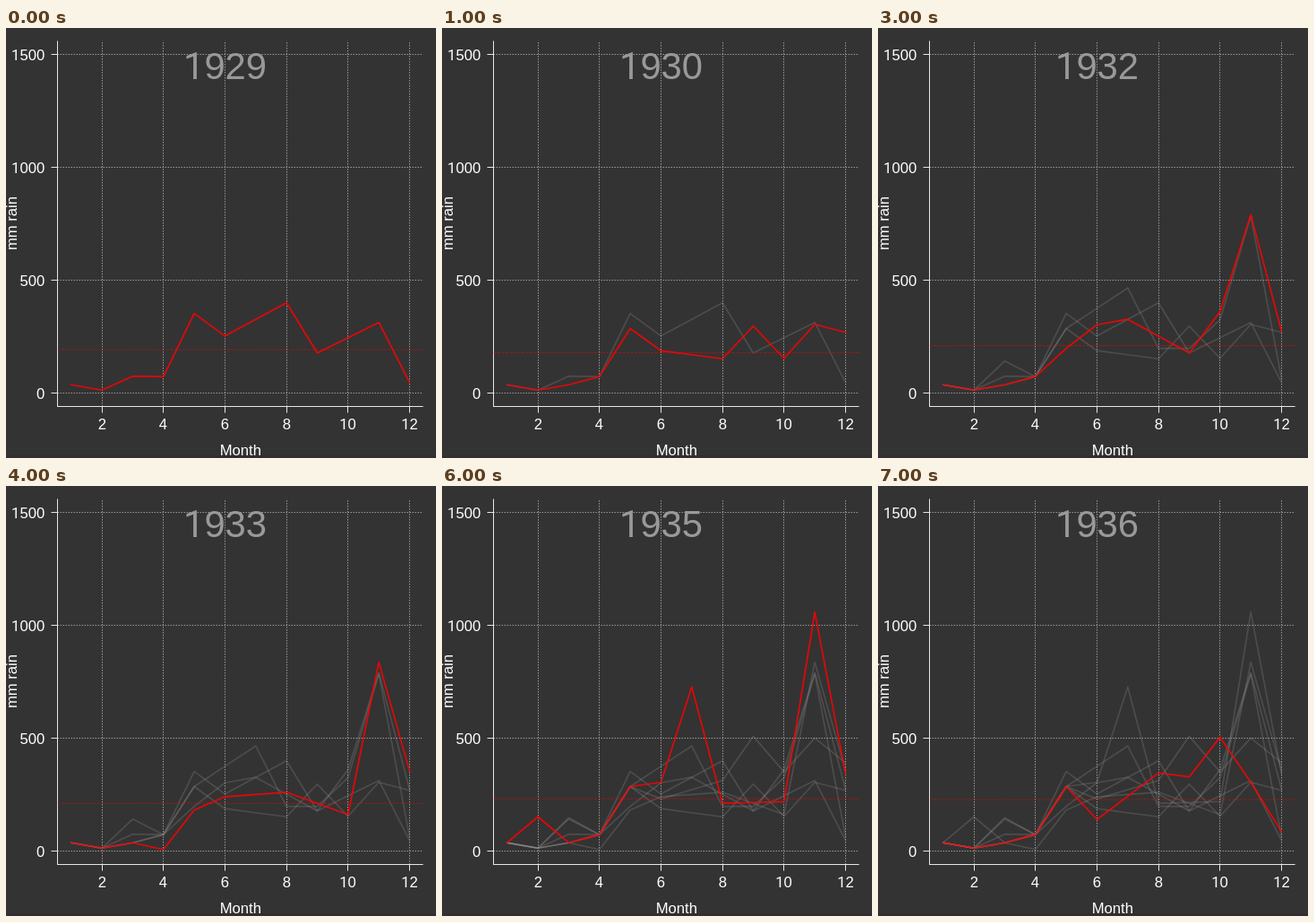
An HTML page that plays this animation: 480 px wide and 480 px high, repeating every 8 s.

```html
<!DOCTYPE html>
<html lang="en">
<head>
<meta charset="utf-8">
<title>Monthly rain</title>
<style>
  html, body { margin: 0; width: 100%; height: 100%; overflow: hidden; background: #333; }
  svg { display: block; width: 100vw; height: 100vh; }
  text { font: 16.67px "Liberation Sans", Arial, sans-serif; fill: #fff; }
  .one { font-family: Roboto, sans-serif; }
  #year { font-size: 41.8px; fill: #999; }
  .grid { stroke: #999; stroke-dasharray: 1.5 1.5; }
  .axis { stroke: #e6e6e6; }
  polyline { fill: none; stroke-width: 1.7; stroke-linejoin: round; stroke-linecap: round; }
  .past { stroke: #999; stroke-opacity: .25; }
  .now { stroke: #f00; stroke-opacity: .88; }
  #mean { stroke: #f00; stroke-opacity: .5; stroke-dasharray: 3 1.5; }
</style>
</head>
<body>
<svg viewBox="0 0 480 480">
  <rect width="480" height="480" fill="#333"/>
  <rect y="477" width="480" height="3" fill="#322d30"/>
  <g id="frame"></g>
  <g id="lines"></g>
  <line id="mean"/>
  <text id="year" x="244.5" y="56.5" text-anchor="middle"></text>
</svg>
<script>
const FIRST = 1929, STEP = 1000;
const MONTHS = "jan feb mar apr may jun jul aug sep oct nov dec".split(" ");

// Plot area, with 4% padding around the data on each side
const area = { left: 57.6, right: 465.6, top: 14.4, bottom: 422.4 };
const scale = (a, b, lo, hi) => v => a + (b - a) * (.04 + (v - lo) / (hi - lo)) / 1.08;
const monthX = scale(area.left, area.right, 1, 12);
const rainY = scale(area.bottom, area.top, 0, 1500);

// Usual start of a year in mm, then the turning points of each year;
// the months between them lie on straight lines
const usual = { jan: 36, feb: 12, mar: 36, apr: 72, may: 285 };
const years = [
  { mar: 74, may: 352, jun: 252, aug: 399, sep: 177, nov: 312, dec: 46 },
  { jun: 187, aug: 151, sep: 296, oct: 153, nov: 304, dec: 268 },
  { mar: 141, jul: 465, aug: 197, sep: 197, oct: 324, nov: 784, dec: 62 },
  { may: 197, jun: 302, jul: 326, sep: 177, oct: 360, nov: 790, dec: 272 },
  { apr: 6, may: 181, jun: 240, aug: 260, oct: 161, nov: 836, dec: 355 },
  { mar: 147, jun: 230, aug: 312, sep: 508, oct: 350, nov: 500, dec: 391 },
  { feb: 151, jun: 304, jul: 727, aug: 211, oct: 218, nov: 1058, dec: 340 },
  { jun: 139, aug: 345, sep: 328, oct: 504, nov: 304, dec: 85 }
].map(fill);

function fill(turns) {
  const known = { ...usual, ...turns };
  const has = i => MONTHS[i] in known;
  return MONTHS.map((name, i) => {
    if (has(i)) return known[name];
    let a = i, b = i;
    while (!has(a)) a--;
    while (!has(b)) b++;
    const from = known[MONTHS[a]], to = known[MONTHS[b]];
    return from + (to - from) * (i - a) / (b - a);
  });
}

const $ = id => document.getElementById(id);
const snap = v => Math.floor(v) + .5;
const label = s => String(s).replace(/1/g, '<tspan class="one">1</tspan>');
const line = (cls, x1, y1, x2, y2) =>
  `<line class="${cls}" x1="${x1}" y1="${y1}" x2="${x2}" y2="${y2}"/>`;
const text = (s, x, y, anchor = "middle", extra = "") =>
  `<text x="${x}" y="${y}" text-anchor="${anchor}" ${extra}>${label(s)}</text>`;

function drawFrame() {
  const { left, right, top, bottom } = area;
  const x0 = snap(left), y0 = snap(bottom);
  let out = "";
  for (let mm = 0; mm <= 1500; mm += 500) {
    const y = snap(rainY(mm));
    out += line("grid", x0, y, right, y) + line("axis", x0 - 7, y, x0, y) +
      text(mm, 43.2, y + 6, "end");
  }
  for (let m = 2; m <= 12; m += 2) {
    const x = snap(monthX(m));
    out += line("grid", x, y0, x, top) + line("axis", x, y0, x, y0 + 7) +
      text(m, x, 448);
  }
  out += line("axis", x0, top, x0, y0 + .5) + line("axis", x0 - .5, y0, right, y0);
  out += text("Month", 261.8, 477);
  out += text("mm rain", 0, 0, "middle", 'transform="translate(12 218) rotate(-90)"');
  $("frame").innerHTML = out;
}

function curve(year, cls) {
  const pts = year.map((mm, i) => `${monthX(i + 1).toFixed(2)},${rainY(mm).toFixed(2)}`);
  return `<polyline class="${cls}" points="${pts.join(" ")}"/>`;
}

let shown = -1;
function draw(time) {
  const n = Math.floor(time / STEP) % years.length;
  if (n === shown) return;
  shown = n;
  const seen = years.slice(0, n + 1);
  $("lines").innerHTML = seen.map((year, i) => curve(year, i < n ? "past" : "now")).join("");
  const all = seen.flat();
  const y = rainY(all.reduce((a, b) => a + b) / all.length);
  const ends = { x1: area.left, x2: area.right, y1: y, y2: y };
  for (const key in ends) $("mean").setAttribute(key, ends[key]);
  $("year").innerHTML = label(FIRST + n);
}

drawFrame();
draw(0);
const start = performance.now();
requestAnimationFrame(function tick() {
  draw(performance.now() - start);
  requestAnimationFrame(tick);
});
</script>
</body>
</html>
```
